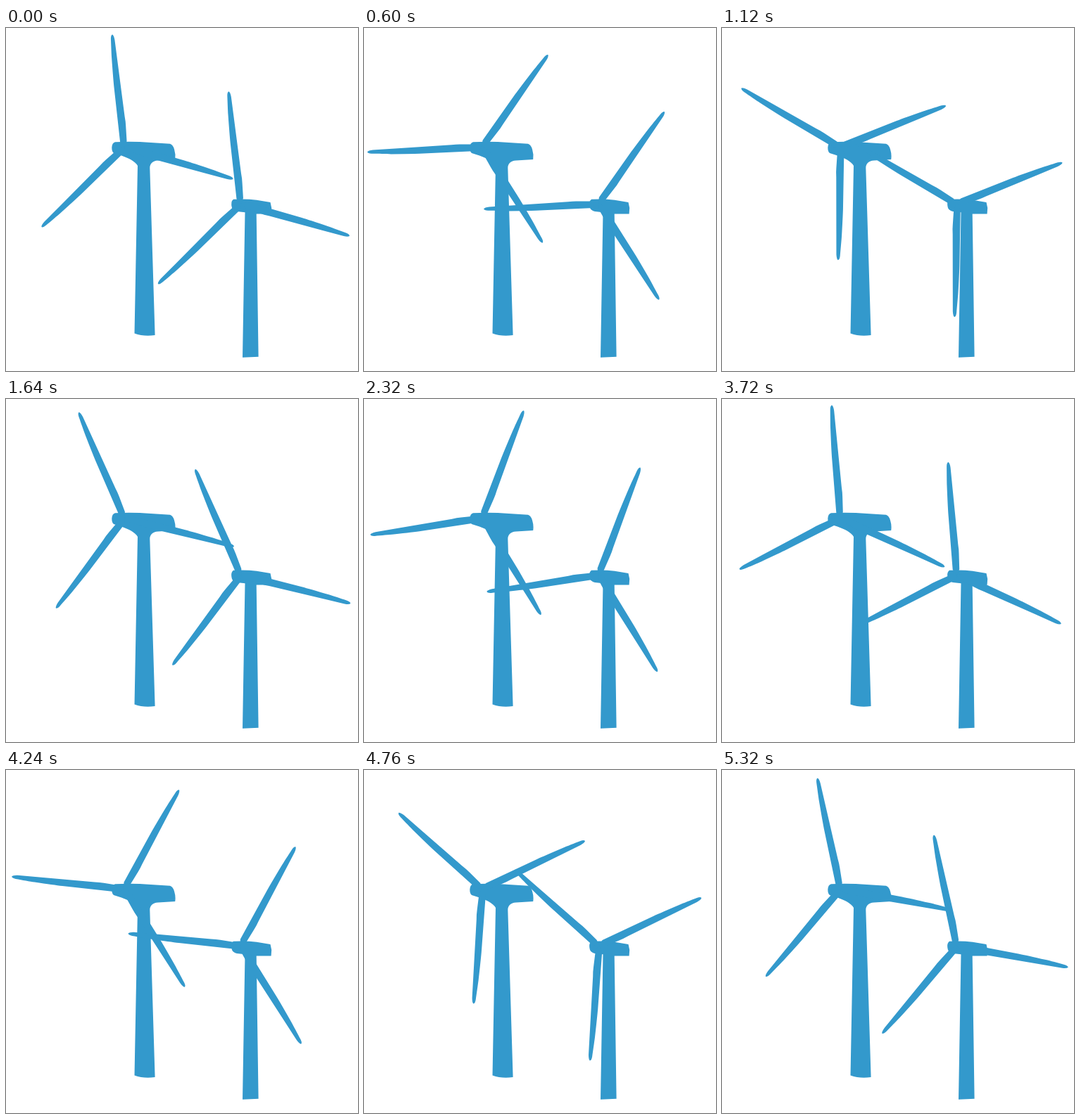
Animation of 500 by 488 pixels, one loop 5.36 s. Source, as an HTML page:

```html
<!DOCTYPE html>
<html lang="en">
<head>
<meta charset="utf-8">
<title>Wind turbines</title>
<style>
html, body { margin: 0; width: 100%; height: 100%; overflow: hidden; background: #fff; }
svg { display: block; width: 500px; height: 488px; fill: #39c; }
</style>
</head>
<body>
<svg viewBox="0 0 500 488">
  <defs>
    <path id="blade" d="M0-161C-1.6-160.6-2.5-158.5-2.8-155C-3.4-146-4.2-134-4.5-128
      Q-5.5-100-5.6-88L-5.3-8L0 2L4.2-8L5.2-30Q5.6-36 5-43L3.2-122L2.5-153Q2-159.5 0-161Z"/>
    <g id="rotor">
      <use href="#blade" transform="rotate(-6.1)"/>
      <use href="#blade" transform="rotate(106.45)"/>
      <use href="#blade" transform="rotate(226) scale(1 1.017)"/>
    </g>
  </defs>
  <path d="M155 162.2Q172 161.3 190 162L233 164.8Q237 166 239 172.5Q241.3 180 240.2 187
    L216 188.5C208 189 204.5 193 204.3 199L211.6 437Q196 439.5 182.5 434.5L187 196
    C184 190 174 185 164 181.5L153 178Q150.3 176 150.3 170Q150.6 163.5 155 162.2Z"/>
  <path d="M323 243.7Q342 242.8 356 244.8L375.5 248L377.2 256L376.6 264.6L355.7 264.5
    L358.6 467.8L336 468.8L339.5 262.3L328 261Q322.5 259.5 321 256Q318.5 247 323 243.7Z"/>
  <g transform="translate(168.2 169.3)"><use class="spin" href="#rotor"/></g>
  <g transform="translate(333.6 250.3)"><use class="spin" href="#rotor"/></g>
</svg>
<script>
const LOOP = 5360, TICK = 40, STEPS = 130;
const rotors = document.querySelectorAll('.spin');
const start = performance.now();

function draw(now) {
  const tick = Math.floor(Math.max(0, now - start) % LOOP / TICK);
  // The rotor rests for one tick in every 25.
  const step = tick - Math.floor((tick + 1) / 25);
  for (const rotor of rotors) rotor.setAttribute('transform', `rotate(${step * 360 / STEPS})`);
  requestAnimationFrame(draw);
}
draw(start);
</script>
</body>
</html>
```
